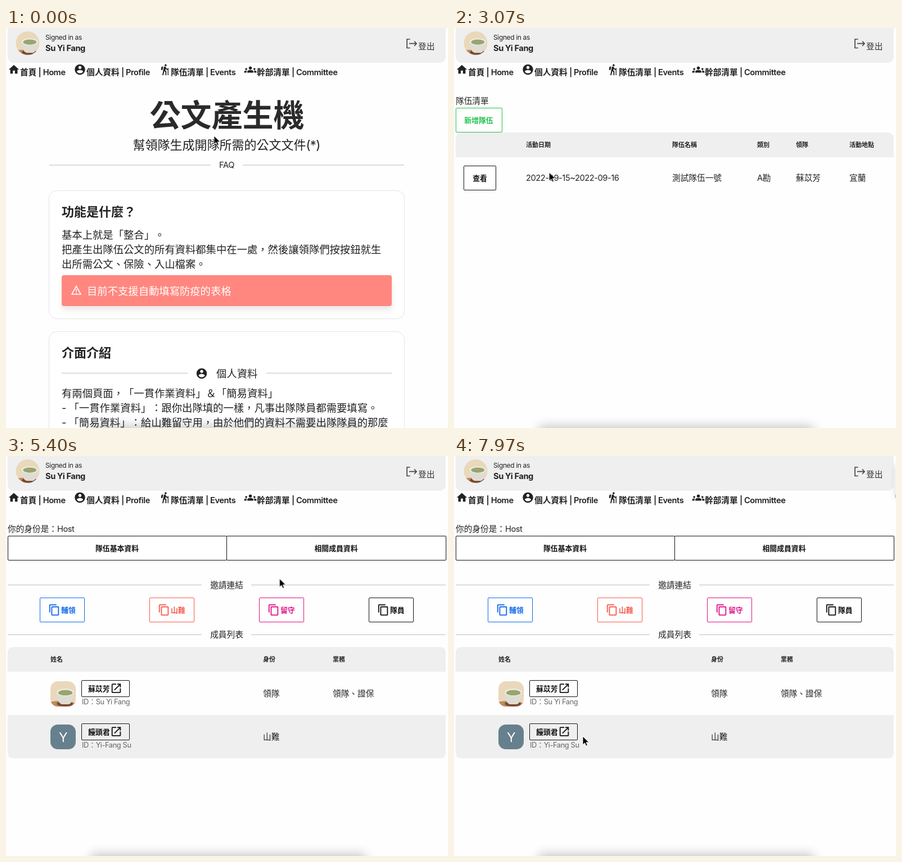
Recreate the animation shown at these times as an HTML page. Size 786 px wide and 712 px high, loop 8000 ms.

```html
<!DOCTYPE html>
<html lang="zh-Hant">
<head>
<meta charset="utf-8">
<title>公文產生機</title>
<style>
html, body { margin: 0; width: 100%; height: 100%; overflow: hidden; background: #fefefe; }
svg { display: block; width: 786px; height: 712px; }
text {
  font-family: Inter, "Noto Sans CJK TC", "Noto Sans CJK JP", "Noto Sans CJK", sans-serif;
  white-space: pre;
  text-spacing-trim: space-all;
  font-feature-settings: "chws" 0, "halt" 0, "palt" 0;
}
.latin { letter-spacing: -.03em; }
#alert { filter: drop-shadow(0 7px 5px #00000016); }
#dock { filter: blur(9px); }
#toast { filter: drop-shadow(0 1px 5px #00000030); }
#bar { transform-origin: 450px 0; }

#home, #list, #event, #detail, #members, #arrow, #hand { animation: 8s step-end infinite; }
#home { animation-name: home; }
#list { animation-name: list; }
#event { animation-name: event; }
#detail { animation-name: detail; }
#members { animation-name: members; }
#arrow { animation-name: arrow; }
#hand { animation-name: hand; }
#cursor { animation: move 8s ease-in-out infinite; }
#viewHover { animation: viewHover 8s linear infinite; }
#tabHover { animation: tabHover 8s linear infinite; }
#stayHover { animation: stayHover 8s linear infinite; }
#toast { animation: slide 8s linear infinite; }
#bar { animation: shrink 8s linear infinite; }

@keyframes home { 0% { visibility: visible } 28.75%, 100% { visibility: hidden } }
@keyframes list { 0% { visibility: hidden } 28.75% { visibility: visible } 46.25%, 100% { visibility: hidden } }
@keyframes event { 0% { visibility: hidden } 46.25%, 100% { visibility: visible } }
@keyframes detail { 0% { visibility: hidden } 46.25% { visibility: visible } 61.9%, 100% { visibility: hidden } }
@keyframes members { 0% { visibility: hidden } 61.9%, 100% { visibility: visible } }

@keyframes move {
  0%, 11.25% { transform: translate(370px, 192px) }
  20.6% { transform: translate(305px, 84px) }
  30.6% { transform: translate(305px, 84px); animation-timing-function: ease-in }
  38.375% { transform: translate(170px, 257px); animation-timing-function: ease-out }
  41.6%, 46.9% { transform: translate(50px, 268px) }
  58.75%, 64.4% { transform: translate(502px, 164px) }
  70.6% { transform: translate(471px, 272px) }
  88.75% { transform: translate(471px, 272px); animation-timing-function: ease-in }
  90.875% { transform: translate(418px, 366px); animation-timing-function: ease-out }
  98.1%, 100% { transform: translate(229px, 499px) }
}
@keyframes hand {
  0% { opacity: 0 } 20% { opacity: 1 } 31.6% { opacity: 0 } 40.4% { opacity: 1 }
  47.5% { opacity: 0 } 58.2% { opacity: 1 } 66% { opacity: 0 } 69.2% { opacity: 1 }
  90%, 100% { opacity: 0 }
}
@keyframes arrow {
  0% { opacity: 1 } 20% { opacity: 0 } 31.6% { opacity: 1 } 40.4% { opacity: 0 }
  47.5% { opacity: 1 } 58.2% { opacity: 0 } 66% { opacity: 1 } 69.2% { opacity: 0 }
  90%, 100% { opacity: 1 }
}
@keyframes viewHover { 0%, 40.4% { opacity: 0 } 42.9%, 100% { opacity: 1 } }
@keyframes tabHover { 0%, 59% { opacity: 0 } 61.5%, 65% { opacity: 1 } 67.5%, 100% { opacity: 0 } }
@keyframes stayHover { 0%, 69.2% { opacity: 0 } 71.7%, 90.6% { opacity: 1 } 93.1%, 100% { opacity: 0 } }
@keyframes slide {
  0%, 87.25% { transform: translateX(3000px) }
  90.875% { transform: translateX(319px); animation-timing-function: ease-out }
  92.5% { transform: translateX(-25px) }
  94% { transform: translateX(10px) }
  95.5%, 96.5% { transform: translateX(0) }
  98.25% { transform: translateX(-20px); animation-timing-function: ease-in }
  99.625% { transform: translateX(332px) }
  100% { transform: translateX(430px) }
}
@keyframes shrink { 0%, 87.25% { transform: scaleX(1) } 96.5%, 100% { transform: scaleX(.03) } }
</style>
</head>
<body>
<svg id="stage" viewBox="0 0 786 712"></svg>
<script>
const INK = '#222', PALE = '#efefef', BODY = 14.67, SMALL = 12.83;

const ICONS = {
  home: 'M10 20v-6h4v6h5v-8h3L12 3 2 12h3v8z',
  person: 'M12 2C6.48 2 2 6.48 2 12s4.48 10 10 10 10-4.48 10-10S17.52 2 12 2zm0 3c1.66 0 3 1.34 3 3s-1.34 3-3 3-3-1.34-3-3 1.34-3 3-3zm0 14.2c-2.5 0-4.71-1.28-6-3.22.03-1.99 4-3.08 6-3.08 1.99 0 5.97 1.09 6 3.08-1.29 1.94-3.5 3.22-6 3.22z',
  hiker: 'M13.5 5.5c1.1 0 2-.9 2-2s-.9-2-2-2-2 .9-2 2 .9 2 2 2zM17.5 10.78c-1.23-.37-2.22-1.17-2.8-2.18l-1-1.6c-.41-.65-1.11-1-1.84-1-.78 0-1.59.5-1.78 1.44S7 23 7 23h2.1l1.8-8 2.1 2v6h2v-7.5l-2.1-2 .6-3c1 1.15 2.41 2.01 4 2.34V23H19V9h-1.5v1.78zM7.43 13.13l-2.12-.41c-.54-.11-.9-.63-.79-1.17l.76-3.93c.21-1.08 1.26-1.79 2.34-1.58l1.16.23-1.35 6.86z',
  group: 'M4 13a2 2 0 1 0 0-4 2 2 0 0 0 0 4zm1.1 1.1C2.5 13.7 0 14.6 0 16.4V18h4.5v-1.6c0-.8.2-1.6.6-2.3zM20 13a2 2 0 1 0 0-4 2 2 0 0 0 0 4zm4 3.4c0-1.8-2.5-2.7-5.1-2.3.4.7.6 1.5.6 2.3V18H24zM16.2 13.7c-2.6-1.2-5.8-1.2-8.4 0-1.1.4-1.8 1.5-1.8 2.7V18h12v-1.6c0-1.2-.7-2.3-1.8-2.7zM12 12a3 3 0 1 0 0-6 3 3 0 0 0 0 6z',
  copy: 'M16 1H4c-1.1 0-2 .9-2 2v14h2V3h12V1zm3 4H8c-1.1 0-2 .9-2 2v14c0 1.1.9 2 2 2h11c1.1 0 2-.9 2-2V7c0-1.1-.9-2-2-2zm0 16H8V7h11v14z',
  open: 'M19 19H5V5h7V3H5c-1.1 0-2 .9-2 2v14c0 1.1.9 2 2 2h14c1.1 0 2-.9 2-2v-7h-2v7zM14 3v2h3.6l-9.8 9.8 1.4 1.4L19 6.4V10h2V3h-7z',
  download: 'M19 9h-4V3H9v6H5l7 7 7-7zM5 18v2h14v-2H5z'
};

// Text is placed by its left edge (or middle) and the vertical centre of its glyphs.
function text(x, y, str, { size = BODY, weight = 400, fill = INK, anchor = 'start' } = {}) {
  const runs = str.replace(/[\x20-\x7e]+/g, s => `<tspan class="latin">${s}</tspan>`);
  return `<text x="${x}" y="${y + size * .37}" font-size="${size}" font-weight="${weight}" fill="${fill}" text-anchor="${anchor}">${runs}</text>`;
}
const bold = (x, y, str, size = SMALL, fill = '#111', anchor = 'start') =>
  text(x, y, str, { size, weight: 700, fill, anchor });
const rect = (x, y, w, h, fill, extra = '') =>
  `<rect x="${x}" y="${y}" width="${w}" height="${h}" fill="${fill}" ${extra}/>`;
const outline = (x, y, w, h, color, fill = '#fff') =>
  rect(x + .5, y + .5, w - 1, h - 1, fill, `rx="1.5" stroke="${color}"`);
const icon = (name, x, y, fill = INK) =>
  `<path d="${ICONS[name]}" fill="${fill}" transform="translate(${x} ${y}) scale(.917)"/>`;
const group = (id, ...parts) => `<g id="${id}">${parts.join('')}</g>`;
const stroke = (d, color, width) =>
  `<path d="${d}" fill="none" stroke="${color}" stroke-width="${width}"/>`;

function divider(y, left, leftEnd, rightStart, right, label = '') {
  return stroke(`M${left} ${y}H${leftEnd}M${rightStart} ${y}H${right}`, '#dcdcdc', 2) +
    (label && text(392.5, y, label, { anchor: 'middle' }));
}

function avatar(x, y, size, radius, id) {
  return `<svg x="${x}" y="${y}" width="${size}" height="${size}" viewBox="0 0 44 44">
    <clipPath id="${id}"><rect width="44" height="44" rx="${radius}"/></clipPath>
    <g clip-path="url(#${id})">
      <rect width="44" height="44" fill="#ead8bb"/>
      <path d="M0 36Q20 31 44 38V44H0z" fill="#b98a62"/>
      <ellipse cx="25" cy="39" rx="14" ry="4.5" fill="#75482f"/>
      <path d="M11 20Q12 38 20 40H32Q39 38 41 20z" fill="#dfdcd2"/>
      <ellipse cx="26" cy="19.500" rx="15" ry="6.5" fill="#f1eee4"/>
      <ellipse cx="26" cy="20" rx="12.5" ry="4.8" fill="#96a572"/>
    </g></svg>`;
}

const nav = [['home', 3, 25, '首頁 | Home'], ['person', 120.5, 143, '個人資料 | Profile'],
  ['hiker', 271.5, 293, '隊伍清單 | Events'], ['group', 423.5, 446, '幹部清單 | Committee']];

const header = () =>
  `<path d="M3 0H782V50Q782 62 770 62H15Q3 62 3 50z" fill="${PALE}"/>` +
  avatar(17.5, 6, 42, 22, 'round') +
  text(70, 16.5, 'Signed in as', { size: 12 }) +
  bold(70, 36, 'Su Yi Fang', BODY, INK) +
  stroke('M718.500 20H713V35.500H718.500M717 27.700H730M726 23.500L730 27.700 726 32', '#444', 1.7) +
  text(733, 33, '登出', { fill: '#333' }) +
  nav.map(([name, ix, tx, label]) =>
    icon(name, ix, 63) + text(tx, 79, label, { weight: 600 })).join('');

function homePage() {
  const para = (x, y, str, fill) => text(x, y, str, { size: 18.33, fill });
  const card = (y, h) => rect(76.5, y, 632, h, '#fff', 'rx="14" stroke="#e4e4e4"');
  return group('home',
    bold(393, 155, '公文產生機', 55, '#2a2a2a', 'middle'),
    text(392, 208, '幫領隊生成開隊所需的公文文件(*)', { size: 22, anchor: 'middle' }),
    divider(244, 77, 364, 421, 708, 'FAQ'),
    card(289.5, 228),
    bold(99, 327, '功能是什麼？', 22, INK),
    para(99, 368, '基本上就是「整合」。'),
    para(99, 394, '把產生出隊伍公文的所有資料都集中在一處，然後讓領隊們按按鈕就生'),
    para(99, 420, '出所需公文、保險、入山檔案。'),
    rect(99, 440, 587, 55, '#ff877f', 'rx="4" id="alert"'),
    stroke('M125 459.500L133 474H117zM125 464.500V469.500M125 471V472.500', '#fff', 1.6),
    para(144, 468, '目前不支援自動填寫防疫的表格', '#fff'),
    card(540.5, 200),
    bold(99, 578, '介面介紹', 22, INK),
    divider(614.5, 99, 323, 463, 686),
    icon('person', 337, 604),
    para(374, 615, '個人資料'),
    para(99, 650, '有兩個頁面，「一貫作業資料」＆「簡易資料」'),
    para(99, 676, '- 「一貫作業資料」：跟你出隊填的一樣，凡事出隊隊員都需要填寫。'),
    para(99, 702, '- 「簡易資料」：給山難留守用，由於他們的資料不需要出隊隊員的那麼'));
}

function listPage() {
  const columns = [[128, '活動日期', '2022-09-15~2022-09-16'], [388, '隊伍名稱', '測試隊伍一號'],
    [539, '類別', 'A勘'], [608, '領隊', '蘇苡芳'], [703, '活動地點', '宜蘭']];
  return group('list',
    text(3, 130, '隊伍清單'),
    outline(3, 142, 83, 44, '#1fc24c'),
    bold(44, 164, '新增隊伍', SMALL, '#1fc24c', 'middle'),
    `<path d="M3 230V198Q3 186 15 186H770Q782 186 782 198V230z" fill="${PALE}"/>`,
    ...columns.map(([x, head, cell]) => bold(x, 208, head, 11, INK) + text(x, 267, cell)),
    outline(17, 245, 58, 44, '#111'),
    bold(46, 267, '查看', SMALL, '#111', 'middle'),
    group('viewHover', outline(17, 245, 58, 44, '#111', '#111'),
      bold(46, 267, '查看', SMALL, '#fff', 'middle')));
}

const eventTabs = () => group('event',
  text(3, 130, '你的身份是：Host'),
  outline(3, 142, 390, 44, '#111'),
  outline(392, 142, 391, 44, '#111'),
  bold(197.5, 164, '隊伍基本資料', SMALL, '#111', 'middle'),
  bold(587, 164, '相關成員資料', SMALL, '#111', 'middle'),
  group('tabHover', outline(392, 142, 391, 44, '#111', '#000'),
    bold(587, 164, '相關成員資料', SMALL, '#fff', 'middle')));

function detailPage() {
  const fields = [['隊伍名稱', '測試隊伍一號', '活動地點', '宜蘭'],
    ['開始日期', '2022/09/15', '隊伍分級', 'A勘'], ['結束日期', '2022/09/16', '群隊', '天狼'],
    ['包車', 'Type here', '包車電話', 'Type here'], ['無線電頻道', '000 Mhz', '無線電台號', '號號']];
  const field = (x, y, label, value) =>
    text(x + 3.5, y, label) + rect(x, y + 19, 294, 44, PALE, 'rx="1.500"') +
    text(x + 15.5, y + 41, value, { size: SMALL, fill: value === 'Type here' ? '#b0b0b0' : INK });
  return group('detail',
    rect(3, 208, 133, 44, '#0464fa', 'rx="2"'),
    rect(136, 208, 143, 44, '#1fc24c', 'rx="2"'),
    stroke('M22 237L34 225', '#fff', 4.5),
    stroke('M35 224L37 222', '#fff', 4.5),
    stroke('M21 222L37 238', '#0464fa', 5),
    stroke('M21 222L37 238', '#fff', 2),
    bold(41, 230, '編輯模式 OFF', SMALL, '#fff'),
    icon('download', 151, 219, '#fff'),
    bold(173, 230, '生成＆下載文件', SMALL, '#fff'),
    divider(273.5, 3, 333, 451, 782, '基本隊伍資訊'),
    ...fields.map(([a, b, c, d], i) =>
      field(3, 314 + i * 81, a, b) + field(393, 314 + i * 81, c, d)));
}

function membersPage() {
  const invite = (x, label, color, fill = '#fff', ink = color) =>
    outline(x, 252, 80, 44, color, fill) + icon('copy', x + 15, 263, ink) +
    bold(x + 38, 274, label, SMALL, ink);
  const person = (y, name, account, role, duty) =>
    outline(134, y - 24, 86, 30, '#111', 'none') + bold(146, y - 9, name) +
    icon('open', 185, y - 20.5, '#111') +
    text(135, y + 14.5, 'ID：' + account, { size: SMALL, fill: '#666' }) +
    text(457, y, role) + text(581, y, duty);
  return group('members',
    divider(229.5, 3, 348, 436, 782, '邀請連結'),
    invite(60, '輔領', '#0f69ee'), invite(255, '山難', '#f9594c'),
    invite(450, '留守', '#df1286'), invite(645, '隊員', '#111'),
    group('stayHover', invite(450, '留守', '#d9157f', '#d9157f', '#fff')),
    divider(318, 3, 348, 436, 782, '成員列表'),
    `<path d="M3 384V350Q3 340 13 340H772Q782 340 782 350V384z" fill="${PALE}"/>`,
    `<path d="M3 461H782V528Q782 538 772 538H13Q3 538 3 528z" fill="${PALE}"/>`,
    bold(79, 362, '姓名', 11, INK), bold(457, 362, '身份', 11, INK), bold(581, 362, '業務', 11, INK),
    avatar(79, 401, 45, 13, 'soft'),
    rect(79, 478, 45, 44, '#67808d', 'rx="13"'),
    text(101.5, 500, 'Y', { size: 23, fill: '#fff', anchor: 'middle' }),
    person(423, '蘇苡芳', 'Su Yi Fang', '領隊', '領隊、證保'),
    person(500, '饅頭君', 'Yi-Fang Su', '山難', ''));
}

const toast = () => group('toast',
  rect(450, 14, 320, 60, '#fff', 'rx="4"'),
  '<circle cx="473" cy="45" r="10" fill="#22a83a"/>',
  stroke('M468.500 45.500L472 49 478 42', '#fff', 2),
  rect(450, 69.5, 320, 4.5, '#22b33c', 'id="bar"'));

const cursor = () => group('cursor',
  group('arrow', '<path d="M0 0V15L3.500 11.700 5.800 17 8.300 16 6 10.800H11z" fill="#000" stroke="#fff" stroke-width=".9"/>'),
  group('hand', '<path transform="translate(-5 -1)" d="M5 1.200c-1 0-1.500.7-1.500 1.500v7L2 8.200C1 7.500-.2 8.600.4 9.800L4 15.500V17.500h8v-2c1-1.500 1.600-3 1.600-5V7.500c0-1.300-1.800-1.300-2-.2 0-1.600-2-1.600-2.200-.3 0-1.600-2.200-1.600-2.400-.2V2.700C7 1.800 6 1.200 5 1.200zM6 11v3.500M8.300 11v3.500M10.500 11v3.500" fill="#fff" stroke="#111" stroke-width="1"/>'));

document.getElementById('stage').innerHTML = [
  header(), homePage(), listPage(), eventTabs(), detailPage(), membersPage(),
  rect(150, 708, 490, 24, '#00000038', 'id="dock" rx="8"'),
  toast(), cursor()
].join('');
</script>
</body>
</html>
```
